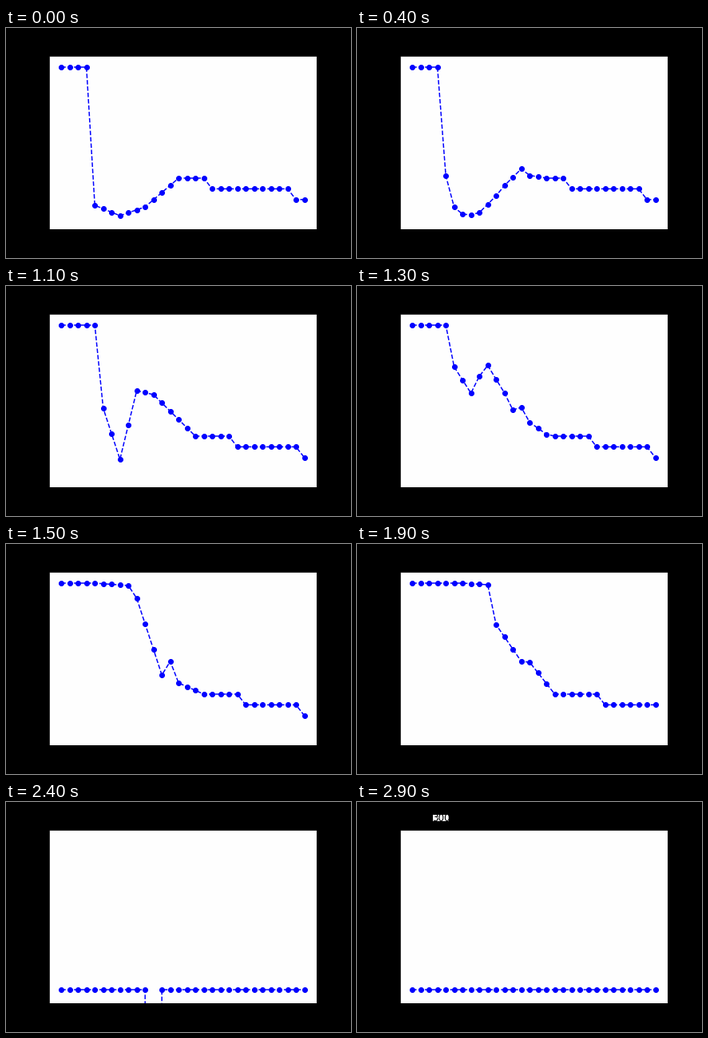
Recreate the animation shown at these times as a matplotlib script. Size 432 px wide and 288 px high, loop 3000 ms.

```python
import numpy as np
import matplotlib.pyplot as plt
from matplotlib.animation import FuncAnimation
from matplotlib.patches import Rectangle

W, H = 432, 288
N, FRAMES, COLLAPSE = 30, 30, 22
HIGH, TAIL, FLOOR, STEP = 49, 188, 235, 13.4   # heights in pixels from the top
FAR = 8000

index = np.arange(N)

# Key poses of the falling front: corners as (point index, height)
poses = {
    0: [(3, HIGH), (4, 222), (7, FLOOR), (10, 224), (14, TAIL)],
    7: [(3, HIGH), (4, 157), (5, 223), (6, FLOOR), (8, 231), (11, 184),
        (13, 161), (14, 182), (16, TAIL)],
    11: [(4, HIGH), (5, 153), (7, 217), (9, 131), (11, 136), (16, TAIL)],
    15: [(4, HIGH), (8, 52), (9, 68), (12, 164), (13, 147), (14, 174),
         (17, TAIL)],
    19: [(6, HIGH), (9, 51), (10, 101), (13, 147), (14, 148), (17, TAIL)],
}
times = list(poses)
fronts = np.array([np.interp(index, *zip(*pose)) for pose in poses.values()])


def curve(frame):
    if frame < COLLAPSE:
        y = np.array([np.interp(frame, times, path) for path in fronts.T])
        # two steps down in the tail, creeping to the right
        steps = (index >= 18 + frame / 4).astype(int)
        steps += index >= 27.1 + frame / 8
        return y + STEP * steps
    y = np.full(N, float(FLOOR))
    if frame < FRAMES - 1:
        # one point plunges out of view
        y[round(11 + 3.75 * (frame - 24))] = FAR
    return y


fig, ax = plt.subplots(figsize=(W / 72, H / 72), dpi=72, facecolor="black")
fig.subplots_adjust(left=0.125, right=0.9, bottom=0.125, top=0.88)
ax.set_facecolor("#fefefe")
ax.set(xticks=[], yticks=[])

line, = ax.plot(index, curve(0), "bo--", lw=1.5, ms=6)
ax.set_ylim(0.875 * H, 0.12 * H)

# Dark digits on a light plate
plate = fig.add_artist(Rectangle((95 / W, 1 - 24 / H), 20 / W, 8 / H,
                                 facecolor="white", lw=0))
label = fig.text(94.2 / W, 1 - 24 / H, "300", color="black", size=12,
                 family="DejaVu Sans", zorder=5)


def update(frame):
    line.set_ydata(curve(frame))
    for part in (plate, label):
        part.set_visible(frame == FRAMES - 1)
    return line, plate, label


anim = FuncAnimation(fig, update, frames=FRAMES, interval=100, repeat=True,
                     repeat_delay=0)
plt.show()
```
